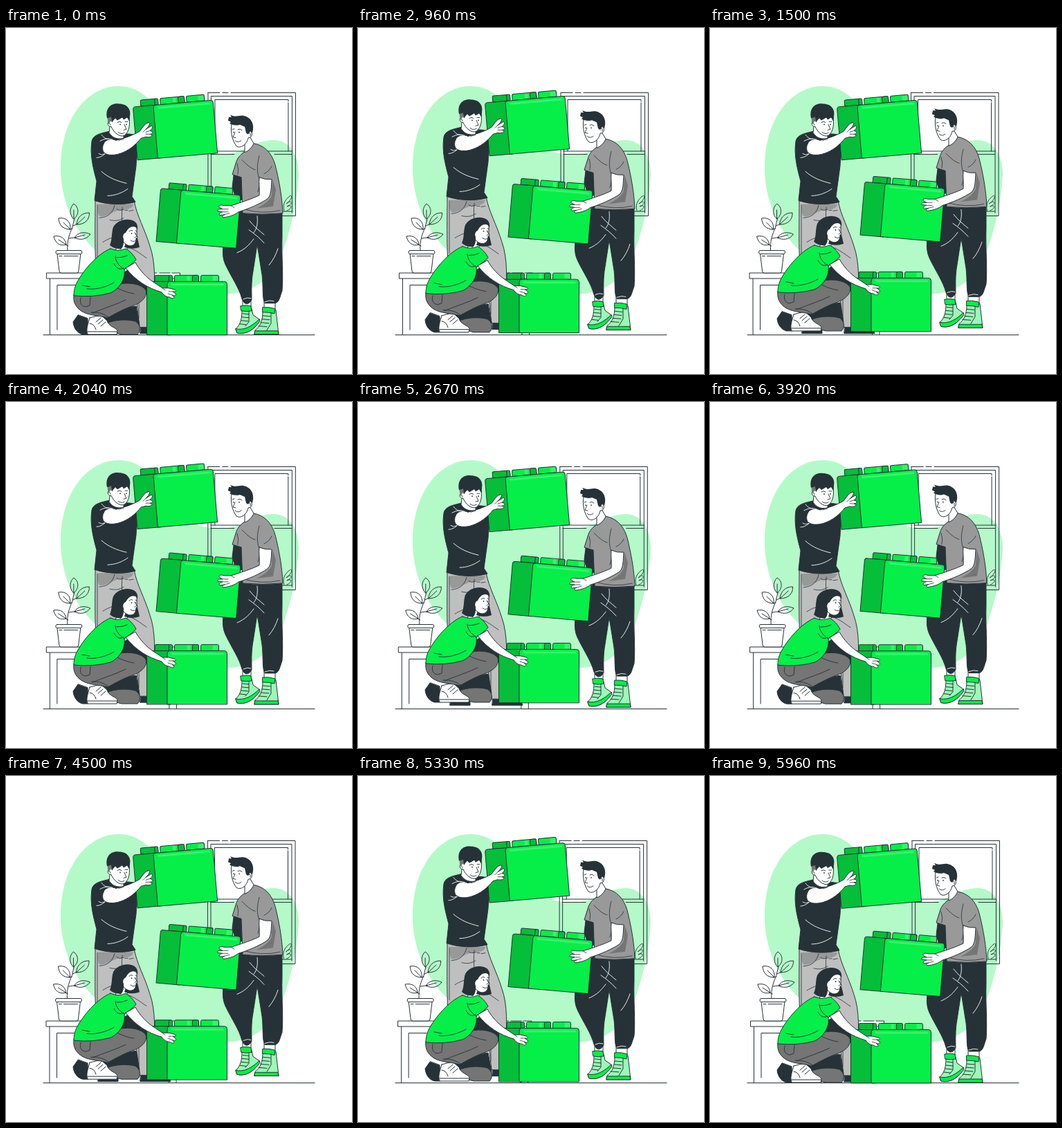
Recreate the animation shown at these times as an HTML page with a canvas. Size 500x500 px, loop 6 s.

```html
<!DOCTYPE html>
<html lang="en">
<head>
<meta charset="utf-8">
<title>Stacking blocks</title>
<style>
html, body { margin: 0; width: 100%; height: 100%; overflow: hidden; background: #fff; }
canvas { display: block; width: 500px; height: 500px; }
</style>
</head>
<body>
<canvas id="stage"></canvas>
<script>
const INK = '#263238', WHITE = '#fff', GREEN = '#06ee48', DEEP = '#05be3a', TINT = '#b4fac8',
  SHINE = '#38f16d', MINT = '#9bf8b6', LIGHT = '#bfbfbf', MID = '#999', GREY = '#757575';
const LOOP = 6000, LEAD = 45;
const canvas = document.getElementById('stage');
const ctx = canvas.getContext('2d');
const ratio = window.devicePixelRatio || 1;
canvas.width = canvas.height = 500 * ratio;

const cache = new Map();
function path(d) {
  if (!cache.has(d)) cache.set(d, new Path2D(d));
  return cache.get(d);
}
function line(d, color = INK, width = 1) {
  ctx.strokeStyle = color;
  ctx.lineWidth = width;
  ctx.stroke(path(d));
}
function flat(color, d) {
  ctx.fillStyle = color;
  ctx.fill(path(d));
}
function shape(color, d) {
  flat(color, d);
  line(d);
}
function dot(x, y, r = 0.9) {
  ctx.fillStyle = INK;
  ctx.beginPath();
  ctx.arc(x, y, r, 0, 7);
  ctx.fill();
}
function shifted(x, y, draw) {
  ctx.save();
  ctx.translate(x, y);
  draw();
  ctx.restore();
}

// Triangle wave: up 10 px and back.
function lift(t, period) {
  const p = (t % period) / period;
  return -10 * (1 - Math.abs(1 - 2 * p));
}
const SHAKE = [0, -1, 2, -4, 4, -4, 4, -4, 2, -1, 0];
function shake(t) {
  const p = t / LOOP * 10, i = Math.floor(p);
  return SHAKE[i] + (SHAKE[i + 1] - SHAKE[i]) * (p - i);
}

// (x, y) is the top left corner.
function brick(x, y, deg) {
  ctx.save();
  ctx.translate(x, y);
  ctx.rotate(deg * Math.PI / 180);
  shape(DEEP, 'M11.5 0V-7Q11.5 -9 13.5 -9H35Q37 -9 37 -7V0Z');
  line('M32 0V-7Q32 -8.5 33 -9');
  shape(GREEN, 'M40 0V-7Q40 -9 42 -9H73Q75 -9 75 -7V0Z');
  shape(DEEP, 'M66 0V-7Q66 -9 68 -9H73Q75 -9 75 -7V0Z');
  flat(SHINE, 'M58 -1V-8H63V-1Z');
  shape(GREEN, 'M78 0V-7Q78 -9 80 -9H102Q104 -9 104 -7V0Z');
  flat(SHINE, 'M95 -1V-8H101Q103 -8 103 -6V-1Z');
  shape(DEEP, 'M0 77V4Q0 0 4 0H34V77Z');
  shape(GREEN, 'M29.5 77V4Q29.5 0 33.5 0H112Q116 0 116 4V77Z');
  flat(SHINE, 'M35 3H109Q112 3 112 6H38Q35 6 35 3Z');
  ctx.restore();
}

function backdrop() {
  flat(TINT, 'M163 84C200 84 222 118 245 150C265 178 290 183 310 183C345 183 355 162 388 162C411 163 423 185 423 212C421 250 412 290 399 325C387 358 358 384 320 384C280 384 255 359 215 355C175 350 145 338 120 312C96 285 79 245 79 203C79 130 118 84 163 84Z');
}

function windowFrame() {
  line('M292 93.5H309M313 93.5H321M325 93.5H418.5V271.5H398M292 93.5V240');
  line('M296.5 240V98.5H413.5V267M302 178V103.5H408V106M408 108V178');
  line('M296 178H414M296 182.5H330M388 182.5H413M398 265H413');
  line('M402 264C399 253 405 247 410 243C415 240 413 249 405 254C413 247 416 254 406 258C414 254 414 261 406 264', INK, 0.9);
}

function table() {
  flat(WHITE, 'M63.5 362H236.5V443H63.5Z');
  line('M63.5 362V443M74 436V371.5H100M236 362V443M246.5 362V443M130 371H230');
  flat(WHITE, 'M58.5 354H251.5V362H58.5Z');
  line('M251.5 357V362H58.5V354H218M222 354H237M240 354H251.5V358');
}

function plant() {
  line('M89 322C88 306 92 298 96 288L99 275M91 304C96 303 99 303 101 303M90 315L86 313M96 290L92 291M97 286L103 283');
  line('M98 276C91 270 92 259 98 254C106 259 106 270 98 276V263');
  line('M102 284C103 273 110 267 120.5 267C121 277 114 284 102 284L114 273');
  line('M93 291C82 291 77 285 76 275C87 273 94 280 93 291L83 281');
  line('M99 303C104 295 113 294 122 298C116 306 107 307 99 303L114 299');
  line('M87 313C77 316 71 310 69 301C79 299 86 304 87 313L76 306');
  shape(WHITE, 'M74 326L77 351Q77 354 80 354H102Q105 354 105 351L108 326Z');
  shape(WHITE, 'M74 321.5H108Q110 321.5 110 324Q110 326.5 108 326.5H74Q72 326.5 72 324Q72 321.5 74 321.5Z');
  line('M77 329.5H81M84 329.5H104');
}

function manLeft() {
  shape(INK, 'M134 433H162V442H133Z');
  shape(INK, 'M195 430H210C222 431 236 434 238 442H194Z');
  shape(LIGHT, 'M129 250H185C189 272 201 292 208 316C216 338 216 372 212 400L205 433H193L188 390C180 355 172 330 168 300L163 350V435H135L130 350C128 315 129 280 129 250Z');
  flat(MID, 'M133 255H184C183 263 172 263 162 264C152 267 145 273 136 273C132 270 132 262 133 255Z');
  line('M132 256V332M135 275C148 274 154 268 157 257M160 262C163 265 166 264 170 263M172 264H176M178 265L184 264', INK, 0.8);
  line('M168 260C166 280 169 305 174 330M172 316C185 319 194 327 203 333M150 278C158 280 164 279 170 275M192 390V420M140 310C148 305 154 303 160 302', INK, 0.8);
  shape(INK, 'M149 150C136 153 126 155 124 164C121 185 126 203 131 222L128 250C146 256 168 257 187 252L182 244L188 200L190 156C182 154 176 153 171 154Z');
  line('M138 208C148 217 161 222 174 225M147 243C157 243 168 239 176 233M138 155C142 160 145 161 149 161M131 188C136 188 140 185 144 182M134 182C137 184 140 184 143 182', WHITE, 0.9);
  shape(WHITE, 'M151 135L149 152C154 160 162 162 170 160L170 149Z');
  shape(WHITE, 'M151 127C154 123 174 121 178 128C179 139 179 150 171 156C164 159 155 151 152 143C147 144 145 136 150 135Z');
  flat(GREY, 'M147 129L158 127L154 137L151 135L149 139Q146 136 147 129Z');
  flat(INK, 'M146 131C143 116 152 109 163 110C176 110 181 119 179 128L178 135L175 130L170 133L168 130L161 134L158 131L153 136L152 129Z');
  line('M161 137Q164 134.5 167 137M172 136L176 136M171 140L174 147L170 148M162 151Q166 155 171 152M149 139Q151 138 151 141', INK, 0.9);
  dot(165, 140);
  dot(174, 140);
}

function armLeft() {
  shape(WHITE, 'M141 168C144 161 152 160 159 163C171 160 183 156 193 150L199 142C202 139 206 136 208 138C207 142 204 145 202 147L210 142C213 143 211 147 208 149L211 150C213 152 211 154 208 154L211 155C211 158 207 159 202 158L195 160C187 170 177 178 165 182C156 185 147 185 142 181C139 178 139 172 141 168Z');
  line('M202 147L198 151M208 149L202 151M208 154L202 154M163 163L170 161', INK, 0.8);
  line('M136 164C143 160 148 160 154 162', WHITE, 0.9);
}

function shoe(body, sole, cuff, laces) {
  shape(MINT, body);
  shape(GREEN, sole);
  shape(GREEN, cuff);
  line(laces);
}

function manRight() {
  flat(WHITE, 'M342 392H354V404H342ZM373 393H389V407H373Z');
  line('M342 395V404M354 395V404M373 396V407M389 396V407');
  shoe('M341 408L355 406L357 415L367 422L358 434C351 440 343 443 334 441L332 435C339 429 341 420 341 408Z',
    'M332 435C344 438 356 431 366 421L367 424C357 438 345 444 334 441Z',
    'M339 402Q346 400 354 402L355 409Q347 411 340 409Z',
    'M342 413L351 414M341 418L351 419M340 423L350 424M338 428L347 429M351 410V425L346 431');
  shoe('M371 410L390 408L394 443H359L360 437C367 432 371 424 371 410Z',
    'M360 438H393L394 443H359Z',
    'M371 404Q380 403 389 406L388 413Q380 411 371 411Z',
    'M371 416L382 417M370 421L381 422M368 426L380 427M365 431L377 432M383 412V427L377 437');
  shape(INK, 'M340 264H399V300C398 330 401 355 399 380C395 391 395 396 389 398H374C370 392 372 372 370 357L363 313L357 352C354 368 355 382 355 393C350 402 344 400 341 392C337 376 326 361 317 342C311 328 314 318 316 296Z');
  line('M363 272C364 282 363 290 358 296M352 279C358 287 366 293 373 299M351 292C358 297 366 303 373 311M334 325C346 320 352 313 358 305M380 343C386 336 390 328 393 319M374 396Q381 393 387 395M343 392Q349 389 354 391', WHITE, 0.9);
  shape(INK, 'M330 205L327 230L333 250L343 248V205Z');
  shape(MID, 'M345 179C339 183 334 188 332 196L327 212L340 216L342 268Q370 271 400 268C399 243 394 218 389 198C384 181 374 170 358 167Z');
  flat(GREY, 'M385 219L390 234L386 258L362 261C372 256 384 248 384 240Z');
  line('M366 185C363 196 362 208 366 218C367 223 366 232 364 237M341 191C347 197 353 203 360 205M343 262Q370 270 396 264M373 211Q381 207 384 200M334 196Q337 205 335 212', INK, 0.8);
  shape(WHITE, 'M345 164V180C351 178 356 172 358 167L352 157Z');
  shape(WHITE, 'M326 138C324 151 327 163 333 171C339 175 348 169 350 159C356 159 358 150 351 149L345 137Z');
  flat(INK, 'M322 129L326 129L324 126C334 130 336 126 343 127C354 129 360 139 356 152L353 149L350 154L347 152L345 143L338 140C332 142 326 140 323 138L325 136L321 134Z');
  line('M327 147L330 146M335 147Q338 145 341 148M331 151L328 158L332 159M331 163Q335 167 340 163M351 152Q354 151 353 156', INK, 0.9);
  dot(329, 151);
  dot(337, 151);
}

function armRight() {
  shape(WHITE, 'M366 216Q374 220 384 219C383 230 384 241 378 247C368 254 350 262 336 266C330 271 322 273 315 274C311 274 313 271 316 270L309 271C307 269 309 267 313 266L306 265C305 262 309 262 313 262L309 260C306 257 310 255 315 257H325C341 252 356 247 366 242C367 235 365 225 366 216Z');
  line('M313 262L321 262M313 266L321 266M316 270L323 268M325 257L330 260', INK, 0.8);
}

function woman() {
  shape(INK, 'M163 358L176 350L204 370V385L190 379L165 368Z');
  shape(INK, 'M104 415L97 425C98 436 105 442 111 443H119L118 420Z');
  shape(INK, 'M128 412L188 402L193 430L165 438L145 425Z');
  shape(GREY, 'M145 427C158 421 176 421 187 424C195 429 195 438 190 443H167C158 441 152 437 145 433Z');
  shape(WHITE, 'M121 419L137 415L146 423C148 432 160 433 161 438L160 443H118C115 435 119 427 121 419Z');
  line('M118 439H160M137 419L130 425M140 422L133 428M144 425L137 431M121 427Q128 428 130 436M101 422Q106 430 113 440');
  shape(GREY, 'M98 386C121 389 142 382 157 372C176 366 196 370 202 379C205 389 195 397 185 401C170 406 158 413 147 419C132 415 116 416 106 407C99 401 97 394 98 386Z');
  line('M108 390C106 398 109 402 115 403L121 401L122 389M125 412C142 405 159 400 173 393M148 418C139 411 130 411 123 411M157 374Q171 382 185 384', INK, 0.9);
  shape(WHITE, 'M163 309L158 322Q166 325 174 321L179 312Z');
  shape(GREEN, 'M151 319C131 327 111 352 103 367C99 374 98 381 98 387Q126 390 151 383C162 378 173 365 171 349C176 345 184 340 188 335C184 327 178 322 173 319Q162 324 151 319Z');
  line('M158 330C158 337 163 344 171 349M156 341C161 350 166 349 170 347M117 377C130 379 146 374 156 368M110 372L121 374M160 332Q169 332 175 329', INK, 0.9);
  flat(INK, 'M174 308L190 304L193 317Q182 321 171 317Z');
  shape(WHITE, 'M167 290C173 284 185 284 189 289V300L190 303L188 304C188 311 185 315 179 315C172 314 167 307 165 301Z');
  flat(INK, 'M150 314C154 305 152 297 155 288C160 279 172 275 182 278C189 280 191 286 190 292L188 288C181 285 176 290 173 296C170 297 168 301 170 305C170 312 170 316 166 320C160 319 154 318 150 314Z');
  line('M178 294Q181 291 183 293M187 293L189 294M186 296L189 301L186 303M180 307Q183 310 187 308', INK, 0.9);
  dot(181.5, 297);
  dot(187, 297, 0.7);
}

function armWoman() {
  shape(WHITE, 'M173 347L187 339C193 350 203 361 214 368L226 376H235L243 378C247 379 246 382 241 381L245 384C247 387 243 388 240 386L243 389C243 392 239 391 236 389C231 389 227 385 225 382C205 376 188 366 173 347Z');
  line('M241 381L235 381M240 386L234 384M226 376L230 379', INK, 0.8);
}

function render(now) {
  const t = (now + LEAD) % LOOP;
  ctx.setTransform(ratio, 0, 0, ratio, 0, 0);
  ctx.fillStyle = WHITE;
  ctx.fillRect(0, 0, 500, 500);
  ctx.lineCap = ctx.lineJoin = 'round';
  backdrop();
  shifted(shake(t), 0, () => { windowFrame(); table(); plant(); });
  line('M54 443.5H446');
  shifted(0, lift(t, 1500), () => { manLeft(); brick(183.4, 114.7, -4.95); armLeft(); });
  shifted(0, lift(t, 3000), () => { manRight(); brick(223.6, 232, 4.9); armRight(); });
  shifted(0, lift(t, 6000), () => { woman(); brick(203.5, 366.5, 0); armWoman(); });
}

const start = performance.now();
function tick() {
  render(performance.now() - start);
  requestAnimationFrame(tick);
}
tick();
</script>
</body>
</html>
```
